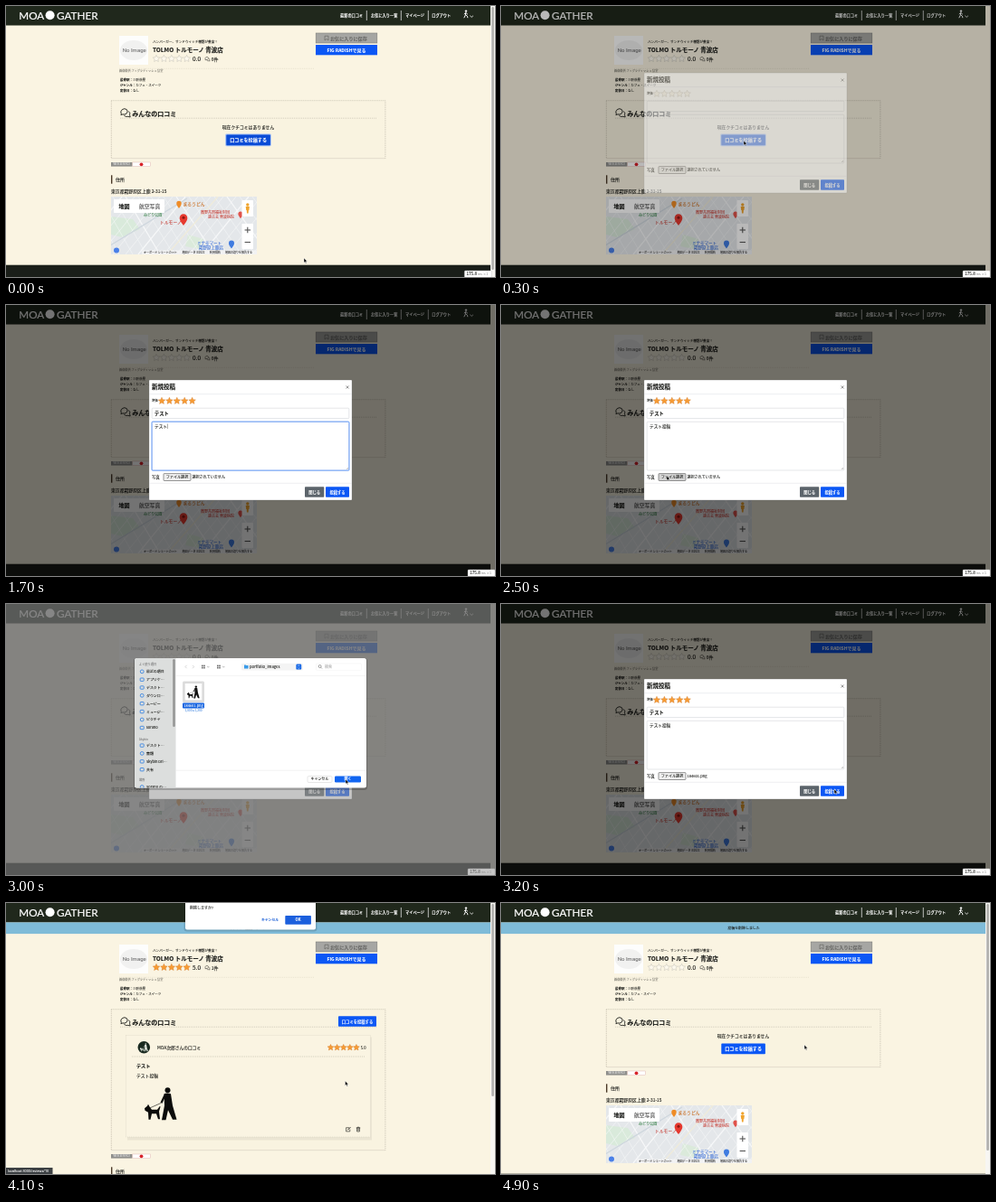
Write an HTML page that moves like this. It is 540 by 300 pixels and loops after 5000 ms.

```html
<!DOCTYPE html>
<html lang="ja">
<head>
<meta charset="utf-8">
<title>口コミ投稿</title>
<style>
html, body { margin: 0; width: 100%; height: 100%; overflow: hidden; background: #faf4e2; }
svg { display: block; width: 540px; height: 300px; font-family: "Noto Sans CJK JP", "Noto Sans JP", "Noto Sans CJK", sans-serif; }
</style>
</head>
<body>
<svg id="stage" viewBox="0 0 540 300" xmlns="http://www.w3.org/2000/svg"></svg>
<script>
const STEP = 100, LOOP = 5000;
const INK = '#1b1c19', BLUE = '#0b57f5', DARK = '#20281c', LINE = '#a9a596', CREAM = '#faf4e2', FILE = '184601.png';
const SERIF = 'font-family="Noto Serif CJK JP, Noto Serif, serif"';
const stage = document.getElementById('stage');

// y is the middle of the line; drawn large and scaled so small sizes stay exact
const text = (x, y, size, str, fill = INK, weight = 400, more = '') =>
  `<text transform="translate(${x} ${y + size * .37}) scale(.1)" font-size="${size * 10}" fill="${fill}" stroke="${fill}" stroke-width="${size * .2}" font-weight="${weight}" ${more}>${str}</text>`;
const mid = (x, y, size, str, fill, weight) => text(x, y, size, str, fill, weight, 'text-anchor="middle"');
const rect = (x, y, w, h, fill, more = '') =>
  `<rect x="${x}" y="${y}" width="${w}" height="${h}" fill="${fill}" ${more}/>`;
const line = (x1, y1, x2, y2, stroke, width = .5, more = '') =>
  `<path d="M${x1} ${y1}L${x2} ${y2}" stroke="${stroke}" stroke-width="${width}" fill="none" ${more}/>`;
const path = (d, fill, more = '') => `<path d="${d}" fill="${fill}" ${more}/>`;
const dot = (x, y, r, fill, more = '') => `<circle cx="${x}" cy="${y}" r="${r}" fill="${fill}" ${more}/>`;
const at = (x, y, body, scale = 1) => `<g transform="translate(${x} ${y}) scale(${scale})">${body}</g>`;
const edge = (stroke, width = .5) => `stroke="${stroke}" stroke-width="${width}"`;
const DASH = 'stroke-dasharray="1 1"';
const button = (x, y, w, h, label, size, fill = BLUE) =>
  rect(x, y, w, h, fill, 'rx=".8"') + mid(x + w / 2, y + h / 2, size, label, '#fff', 700);

function stars(x, y, pitch, r, on) {
  let out = '';
  for (let i = 0; i < 5; i++) {
    let pts = '';
    for (let k = 0; k < 10; k++) {
      const a = k * Math.PI / 5, q = k % 2 ? r * .48 : r;
      pts += `${(x + i * pitch + q * Math.sin(a)).toFixed(2)},${(y - q * Math.cos(a)).toFixed(2)} `;
    }
    const full = i < on;
    out += `<polygon points="${pts}" fill="${full ? '#f79b33' : '#fdf9ee'}" ${edge(full ? '#cf7a2c' : '#b3b0a6', .4)} stroke-linejoin="round"/>`;
  }
  return out;
}

const walker = (c) =>
  dot(26.5, 4, 3, c) +
  path('M22.5 8Q26 6.5 30 8L32 21L36.5 36.5H32L27 26L24.5 37H20L23 21Z', c) +
  line(23.5, 9.5, 19.5, 18, c, 2.2) + line(19.5, 18, 6, 24, c, .6) +
  path('M1 24L4 21.5L5 19.5L7 23L9 25.5H15L18 21.5L18.5 22.5L17 27.5L18 36H16L14 30H9L7.5 36.5H5.5L5 28.5L1.5 26.5Z', c);

const person = (c) => dot(3, 1.2, 1.2, c) +
  path('M2.6 3L2.4 5.6L.8 8.8M2.7 5.4L4.4 6.8L4.9 8.8M2.6 3L.8 4.6M2.9 3L4.8 4.8', 'none', edge(c, 1));

const bubbles = (c) =>
  `<g fill="none" ${edge(c, .9)} stroke-linejoin="round">` +
  path('M1.3 6.7Q-.2 3.6 2.3 1.6Q5 -.3 7.4 1.7Q9.2 4 7 6.2Q5 7.6 3 6.9L.9 7.6Z', 'none') +
  path('M9.3 3.5Q11.6 5 10.6 7.7L11.2 10L8.8 9.4Q6 10 4.4 8.2', 'none') + '</g>';

const editIcon = (x, y) => path(`M${x + 1} ${y - 1.8}H${x - 2.4}V${y + 2.4}H${x + 1.8}V${y}`, 'none', edge(INK, .6)) +
  line(x - .6, y + .7, x + 2.4, y - 2.3, INK, 1);
const trashIcon = (x, y) => path(`M${x - 1.6} ${y - 1.4}H${x + 1.6}L${x + 1.4} ${y + 2.5}H${x - 1.4}Z`, 'none', edge(INK, .6)) +
  line(x - 2.2, y - 1.7, x + 2.2, y - 1.7, INK, .7) + line(x - .7, y - 2.4, x + .7, y - 2.4, INK, .6) +
  line(x - .5, y - .5, x - .5, y + 1.7, INK, .4) + line(x + .5, y - .5, x + .5, y + 1.7, INK, .4);
const pin = (x, y, r, fill) =>
  path(`M${x} ${y + r * 2}Q${x - r * 1.1} ${y + r * .6} ${x - r} ${y}A${r} ${r} 0 1 1 ${x + r} ${y}Q${x + r * 1.1} ${y + r * .6} ${x} ${y + r * 2}Z`, fill);

function header() {
  const nav = [[369, '最新の口コミ'], [403, 'お気に入り一覧'], [441, 'マイページ'], [470.3, 'ログアウト']];
  const font = 'font-family="Lato, sans-serif"';
  return rect(0, 0, 540, 21.5, DARK) +
    text(14.3, 10.3, 11.7, 'MOA', '#fff', 400, font) + dot(48.6, 10.3, 5, '#fff') +
    text(56, 10.3, 11.7, 'GATHER', '#fff', 400, font) +
    nav.map(([x, s]) => text(x, 10.6, 4.2, s, '#fff', 700)).join('') +
    [398.3, 436.3, 466.3].map(x => line(x, 5, x, 16, '#fff', .7)).join('') +
    at(505, 4.4, person('#fff')) +
    path('M512.4 10.7L514.2 12.4L516 10.7', 'none', edge('#fff', .8));
}

function map() {
  let roads = '';
  for (let i = 0; i < 16; i++) {
    const x = i * 14 - 40;
    roads += line(x, 64, x + 52, 0, '#f7f8f9', i % 5 ? .6 : 1.3) + line(x, 0, x + 34 + i, 64, '#f7f8f9', i % 4 ? .5 : 1.2);
  }
  const foot = ['キーボード ショートカット', '地図データ ©2022', '利用規約', '地図の誤りを報告する'];
  const footX = [36, 78.5, 109, 126];
  const red = '#c8453d', blue = '#3b6fd6';
  return '<svg width="161" height="64" viewBox="0 0 161 64">' +
    rect(0, 0, 161, 64, '#e4e7ea') +
    path('M0 22L24 25L32 36L12 45L0 42Z', '#d9eadb') + path('M85 42L102 47L97 58L82 55Z', '#dbeadb') +
    roads + line(-4, 56, 84, 2, '#cfd7de', 1.4) + line(62, 64, 118, 0, '#f0ecdb', 1.3) +
    text(36, 20, 4.1, 'みどり公園', '#4c8f5a') +
    pin(75, 7.5, 2.7, '#ef8c27') + text(79.5, 8, 4.8, 'まるうどん', '#c96d1f') +
    text(54, 28, 4.8, 'トルモーノ', red) +
    text(99, 18, 4, '霞野共同福祉財団', red) + text(107, 23, 4, '連合会 青波病院', red) +
    pin(143, 19, 2.6, '#e0524b') +
    text(95, 51, 4.5, 'ミナモマート', blue) + text(97, 56, 4.5, '霞野原上鹿店', blue) +
    pin(133, 51.5, 3, '#3f7be0') +
    pin(80, 23.5, 4.3, '#e6392f') + dot(80, 23.3, 1.5, '#8b1712') +
    rect(3, 3, 56, 15, '#fff', 'rx=".8"') +
    text(8.5, 10.4, 6, '地図', INK, 700) + text(31, 10.4, 5.8, '航空写真', '#555') +
    rect(144.5, 4, 12.5, 18, '#fff', 'rx=".8"') + dot(150.8, 9, 1.7, '#f0a42e') +
    path('M148.7 11H152.9L152.4 15H151.9L151.6 18.5H150L149.7 15H149.2Z', '#f0a42e') +
    rect(144.5, 30, 12.5, 28, '#fff', 'rx=".8"') +
    line(147.6, 37, 154, 37, '#555', 1.1) + line(150.8, 33.8, 150.8, 40.2, '#555', 1.1) + line(147.6, 50.5, 154, 50.5, '#555', 1.1) +
    rect(34, 59.4, 127, 4.6, '#f5f5f5', 'opacity=".85"') +
    foot.map((s, i) => text(footX[i], 61.8, 3, s, '#222')).join('') +
    dot(6, 59.5, 3, '#4a80e8') + '</svg>';
}
const MAP = map();

function info(s) {
  const x = s.icons ? 206 : 167;
  const rows = [['最寄駅：', '三軒茶屋'], ['ジャンル：', 'カフェ・スイーツ'], ['定休日：', 'なし']];
  return rect(125, 33, 32, 32, '#fdfdfc') +
    `<ellipse cx="141" cy="49" rx="15" ry="11" fill="#f1f1f0"/>` +
    text(128.8, 49, 6, 'No Image', '#777', 400, 'font-family="Roboto, sans-serif"') +
    text(162, 40, 3.6, 'ハンバーガー、サンドウィッチ種類が豊富！') +
    text(162, 48.6, 6.5, 'TOLMO トルモーノ 青波店', INK, 700) +
    (s.icons ? stars(166, 58.3, 8.4, 4, s.review ? 5 : 0) : '') +
    text(x, 58.6, 6.5, s.review ? '5.0' : '0.0') +
    at(x + 13.5, 56, bubbles(INK), .5) + text(x + 20.7, 59, 5, s.review ? '1件' : '0件') +
    line(125, 69.3, 341, 69.3, '#c9c4b3', .4, DASH) +
    text(125, 72.2, 3.15, '画像提供:フィグラディッシュ 食堂', '#77756c') +
    rows.map(([a, b], i) => text(126, 81.3 + i * 6, 3.5, `<tspan font-weight="700">${a}</tspan>${b}`)).join('') +
    rect(342.2, 30, 67.6, 11, '#a6a6a3', edge('#7c7c79', .6)) +
    path('M352 33.2H356V38L354 36.5L352 38Z', 'none', edge('#5e5e5c', .6)) +
    text(358, 35.7, 5.1, 'お気に入りに保存', '#686866', 700) +
    rect(342, 43, 68, 11.3, BLUE) + mid(376, 48.7, 5, 'FIG RADISHで見る', '#fff', 700);
}

function card(s) {
  const h = s.icons ? 112.5 : 72.5, low = s.icons ? 237.5 : 197;
  return rect(134, 135.5, 270, h + 1.5, '#ebe5d3') +
    rect(132.5, 133.5, 270, h, CREAM, edge('#cfcaba') + DASH) +
    (s.icons ? dot(152.3, 146.7, 6.8, '#1a2a20') + at(147.6, 142, walker('#e9efe6'), .25) : '') +
    text(167, 147.2, 4.75, 'MOA次郎さんの口コミ') +
    (s.icons ? stars(358.5, 147, 7.1, 3.6, 5) : '') + text(391.8, 147.2, 4.2, '5.0') +
    line(139, 157, 397, 157, LINE, .5, DASH) +
    text(144, 167.2, 5.1, 'テスト', INK, 700) + text(144, 178.6, 4.8, 'テスト投稿') +
    (s.icons ? at(152, 190.3, walker('#0c0c0b')) : '') +
    editIcon(378, low) + trashIcon(389, low);
}

function reviews(s, h) {
  const head = rect(116.3, 104.7, 302.6, h, '#f9f3e0', edge(LINE, .6) + DASH) +
    (s.icons ? at(126, 113, bubbles(INK)) : '') +
    text(139.2, 119, 7, 'みんなの口コミ', INK, 700) +
    line(126, 124.2, 410, 124.2, LINE, .5, DASH);
  if (s.review) return head + button(367, 112.2, 42, 11.5, '口コミを投稿する', 4.3) + card(s);
  return head + mid(267.5, 134.2, 4.8, '現在クチコミはありません') +
    (s.press ? rect(242.2, 141.6, 50.6, 13.6, '#9dbcf5', 'rx="1.4"') : '') +
    button(243.3, 142.6, 48.6, 11.7, '口コミを投稿する', 5.1, s.press ? '#0a4bd6' : BLUE);
}

function page(s) {
  const dy = s.flash ? 13 : 0;
  const h = !s.review ? 64 : s.icons ? 156 : 116;
  const place = rect(116, 173, 23.5, 4.6, '#8f8f8c') + mid(127.8, 175.2, 3, 'WEB SERVICE', '#eee') +
    rect(139.8, 173, 19.5, 4.6, '#fff', edge('#d9a9a5', .4)) + dot(149.5, 175.3, 1.9, '#d8232a') +
    rect(116, 187.3, 1.4, 9.4, '#4b3a28') + text(121, 192.2, 5, '住所') +
    text(116, 205.2, 4.85, '東京都霞野原区上鹿 2-31-15') +
    at(116, 211, MAP) + rect(0, 286.7, 540, 40, '#1a1e19');
  return rect(0, 0, 540, 300, CREAM) +
    at(0, dy, info(s) + reviews(s, h) + at(0, h - 64, place)) + header() +
    (s.flash ? rect(0, 21.5, 540, 12.6, '#7fbbd8') + mid(268, 28, 3.95, s.flash) : '') +
    rect(535, 0, 5, 300, s.modal ? CREAM : '#f7f6f2') +
    (s.modal ? '' : rect(536.2, 1, 2.7, s.thumb, '#b0b0ad', 'rx="1.3"'));
}

function ime(x, y, word) {
  return rect(x - .4, y + .6, 51.6, 59, '#000', 'opacity=".22" rx="2"') +
    rect(x, y, 50, 58, '#fff', `rx="1.5" ${edge('#b5b5b3', .4)}`) +
    text(x + 2.6, y + 5, 5.2, word, INK, 400, SERIF) +
    rect(x + .3, y + 51.5, 49.4, 6, '#e9e9e8') +
    text(x + 3, y + 54.6, 2.9, 'Tab キーで予測された候補を選択', '#333');
}

const field = (y, h, focus) =>
  (focus ? rect(160.8, y - .4, 218.4, h + .8, 'none', `rx="1.2" ${edge('#a9c8fb', .8)}`) : '') +
  rect(161.2, y, 217.6, h, '#fff', `rx=".9" ${edge(focus ? '#4683ee' : '#c9ccd0', focus ? .7 : .5)}`);

function modal(s) {
  const raw = s.cand && s.focus === 1;
  return rect(158, 83, 224, 133, '#fff', `rx=".8" ${edge('#777', .3)}`) +
    text(161, 91, 6.5, '新規投稿', INK, 700) +
    line(375.6, 89.5, 378.6, 92.5, '#666', .7) + line(378.6, 89.5, 375.6, 92.5, '#666', .7) +
    line(158, 98.6, 382, 98.6, '#dcdfe2') +
    text(161.2, 106.2, 3.3, '評価') + stars(172, 106.2, 8.4, 4, s.rate) +
    field(114.2, 11.4, s.focus === 1) +
    text(164, 120.2, 5.2, s.title, INK, 700, raw ? SERIF + ' text-decoration="underline"' : '') +
    (s.focus === 1 ? line(164.3 + s.title.length * 4.2, 117, 164.3 + s.title.length * 4.2, 123.5, INK) : '') +
    field(129.3, 53.7, s.focus === 2) +
    text(164, 134.3, 4.65, s.body, INK, 400, s.cand ? 'text-decoration="underline"' : '') +
    (s.focus === 2 ? line(164.4 + s.body.length * 4.65, 131.5, 164.4 + s.body.length * 4.65, 137, INK, .4) : '') +
    line(376, 182, 378, 180, '#777', .4) + line(377.2, 182, 378, 181.2, '#777', .4) +
    text(161.2, 190.5, 4.2, '写真') +
    rect(174, 186.6, 30, 7.9, s.pick ? '#d4d4d4' : '#efefef', `rx=".8" ${edge('#555', .6)}`) +
    mid(189, 190.5, 4.1, 'ファイル選択') +
    text(205.4, 190.5, 4.1, s.file || '選択されていません') +
    line(158, 197.3, 382, 197.3, '#dcdfe2') +
    button(330, 201.2, 21.3, 11.6, '閉じる', 4.3, '#5c646b') +
    button(353, 201.2, 26, 11.6, '投稿する', 4.3, s.send ? '#0a48cf' : BLUE) +
    (s.cand ? (raw ? ime(162, 126, s.cand) : ime(163, 139, s.cand)) : '');
}

function picker(s) {
  const heads = [[67, 'よく使う項目'], [149.5, 'Skybin'], [194.8, '場所']];
  const items = [[74.8, '最近の項目'], [83.7, 'アプリケ…'], [92.5, 'デスクト…'], [101.3, 'ダウンロ…'], [110.2, 'ムービー'],
    [119.1, 'ミュージ…'], [128, 'ピクチャ'], [137, 'sorano'], [156.6, 'デスクト…'], [165.4, '書類'], [174.3, 'Skybin Dri…'],
    [183.2, '共有'], [202.5, 'Sorano の…']];
  const grid = (x) => [0, 2.2].map(a => [0, 2.2].map(b => rect(x + a, 67.6 + b, 1.6, 1.6, '#666')).join('')).join('') +
    path(`M${x + 6.2} 69L${x + 7.3} 70.1L${x + 8.4} 69`, 'none', edge('#666', .5));
  return '<clipPath id="sheet"><rect x="142" y="60" width="256" height="143.5" rx="2.5"/></clipPath>' +
    rect(141, 60, 258, 146, '#000', 'opacity=".2" rx="3"') + '<g clip-path="url(#sheet)">' +
    rect(142, 60, 256, 144, '#fff') + rect(142, 60, 45.5, 144, '#dcdedd') +
    rect(184.2, 61, 2.6, 75, '#969796', 'rx="1.3"') +
    heads.map(([y, n]) => text(147, y, 3.2, n, '#777')).join('') +
    items.map(([y, n], i) => (i % 3 ? rect(148.2, y - 1.7, 4, 3.4, 'none', `rx=".6" ${edge('#2a7de1', .8)}`) :
      dot(150.2, y, 1.9, 'none', edge('#2a7de1', .8))) + text(155, y, 3.95, n)).join('') +
    path('M199.6 67.8L198 69.5L199.6 71.2M206 67.8L207.6 69.5L206 71.2', 'none', edge('#c4c4c4', .7)) +
    grid(216) + grid(233) +
    rect(260, 65.8, 68, 7.6, '#f4f4f4', 'rx="1.2"') +
    path('M263 67.4H264.8L265.4 68H267.6V71.6H263Z', '#3a9be8') + text(269, 69.5, 4.2, 'portfolio_images') +
    rect(320.4, 66.6, 5.8, 6, '#1567e6', 'rx="1.2"') +
    path('M322.1 69L323.3 67.8L324.5 69M322.1 70.3L323.3 71.5L324.5 70.3', 'none', edge('#fff', .5)) +
    rect(342.5, 65.8, 50, 7.6, '#fff', `rx="1.2" ${edge('#eee', .4)}`) +
    dot(346.6, 69, 1.5, 'none', edge('#666', .6)) + line(347.7, 70.2, 349, 71.5, '#666', .6) + text(352, 69.5, 4, '検索', '#aaa') +
    line(187.5, 79.3, 398, 79.3, '#e4e4e4') +
    (s.chosen ? rect(195, 85.5, 24, 23.5, '#dcdcdc', 'rx="1.5"') + rect(195, 109.6, 24, 6, '#1463e0', 'rx="1"') : '') +
    rect(197.3, 87.8, 19.4, 19, '#fff', edge('#ccc', .4)) + at(199.5, 90, walker('#111'), .39) +
    mid(207, 112.6, 4, FILE, s.chosen ? '#fff' : INK) + mid(207, 117.8, 3.2, '1,000×1,200', '#4a8ce0') +
    line(187.5, 184.2, 398, 184.2, '#e4e4e4') +
    rect(333, 190.6, 27, 6.9, '#fff', `rx="1.2" ${edge('#ccc', .5)}`) + mid(346.5, 194, 4, 'キャンセル') +
    rect(363, 190.6, 29, 6.9, s.chosen ? '#1266f1' : '#d5d5d5', 'rx="1.2"') + mid(377.5, 194, 4, '開く', '#fff', 700) + '</g>';
}

const confirmBox = () =>
  rect(196.5, -4, 147, 35.5, '#000', 'opacity=".14" rx="3"') + rect(198, -4, 144, 33.6, '#fff', 'rx="2"') +
  text(203, 5.6, 4, '削除しますか?') + mid(291.5, 19, 3.8, 'キャンセル', '#1f62d8', 700) +
  button(308.3, 14, 28.6, 9.8, 'OK', 4.1, '#1b5fdd');

function badge(s) {
  const right = s.modal ? 540 : 536.3, w = s.count > 9 ? 33.5 : 30;
  return rect(right - w, 293, w, 7.5, '#fff', `rx="1" ${edge('#bbb', .4)}`) +
    text(right - w + 2.2, 296.6, 4.6, `${s.ms} <tspan fill="#777" stroke="none" font-size="35">ms ×${s.count}</tspan>`);
}

const arrow = (x, y) => at(x, y, path('M0 0V5.2L1.2 4.1L2 5.9L2.9 5.5L2.1 3.8H3.7Z', '#000', edge('#fff', .45)));

// each row: time, then what differs from that moment on
const script = [
  [0, { icons: 1, thumb: 291, ms: '175.8', count: 1, rate: 0, title: '', body: '', press: 1 }],
  [300, { modal: .5 }], [400, { modal: 1 }],
  [500, { rate: 2 }], [600, { rate: 5 }], [700, { focus: 1 }],
  [800, { title: 'ｔ', cand: 'T' }], [900, { title: 'てs', cand: 'TEs' }], [1000, { title: 'てす', cand: 'テス' }],
  [1100, { title: 'てすと', cand: 'テスト' }], [1200, { title: 'テスト', cand: '' }],
  [1300, { focus: 2 }], [1400, { body: 'ｔ', cand: 'T' }], [1500, { body: 'てs', cand: 'TEs' }],
  [1600, { body: 'てすと', cand: 'テスト' }], [1700, { body: 'テスト', cand: '' }],
  [1800, { body: 'テストと', cand: 'と' }], [1900, { body: 'テストとう', cand: '投' }],
  [2000, { body: 'テストとうこう', cand: '投稿' }], [2100, { body: 'テスト投稿', cand: '' }],
  [2300, { focus: 0 }], [2500, { pick: 1 }], [2700, { picker: 1 }], [2800, { chosen: 1 }],
  [3100, { picker: 0, pick: 0, file: FILE }], [3300, { send: 1 }],
  [3400, { modal: 0, review: 1, icons: 0, press: 0, flash: '口コミを投稿しました', thumb: 236, ms: '575.3', count: 17 }],
  [3500, { icons: 1, thumb: 213 }], [3700, { ms: '' }], [3800, { link: 1 }], [4000, { ask: 1 }],
  [4300, { ask: 0 }], [4400, { link: 0, review: 0, flash: '投稿を削除しました', thumb: 273 }]
];

const mouse = [[0, 329, 279], [100, 318, 256], [200, 285, 180], [300, 268, 149], [400, 250, 138], [500, 181, 107], [600, 206, 107],
  [700, 230, 119], [1200, 230, 132], [1300, 235, 145], [2200, 232, 158], [2400, 186, 189], [2500, 183, 189], [2600, 183, 189],
  [2700, 200, 130], [2800, 207, 98], [2900, 300, 156], [3000, 375, 194], [3100, 375, 195], [3200, 368, 205], [3300, 367, 207],
  [3400, 369, 209], [3600, 380, 229], [3800, 389, 250], [4000, 389, 250], [4100, 374.5, 197], [4200, 334, 60], [4300, 322, 18],
  [4400, 322, 19], [4600, 328, 90], [4800, 335, 155], [4900, 335, 157]];

function pointer(t) {
  if ((t >= 800 && t < 1200) || (t >= 1400 && t < 2200)) return '';
  const i = mouse.findIndex(m => m[0] > t);
  const a = mouse[(i < 0 ? mouse.length : i) - 1], b = i < 0 ? a : mouse[i];
  const k = b === a ? 0 : (t - a[0]) / (b[0] - a[0]);
  return arrow(a[1] + (b[1] - a[1]) * k, a[2] + (b[2] - a[2]) * k);
}

function draw(t) {
  const s = {};
  for (const [time, change] of script) if (time <= t) Object.assign(s, change);
  let out = page(s);
  if (s.modal) out += rect(0, 0, 540, 300, '#000', `opacity="${s.modal * .55}"`) +
    `<g opacity="${s.modal}">${at(0, (s.modal - 1) * 18, modal(s))}</g>`;
  if (s.ms) out += badge(s);
  if (s.picker) out += rect(0, 0, 540, 300, '#969696', 'opacity=".55"') + picker(s);
  if (s.link) out += rect(0, 293, 51.5, 7, '#3c4043') +
    text(2, 296.5, 3.8, 'localhost:3000/reviews/10', '#fff', 400, 'font-family="Roboto, sans-serif"');
  if (s.ask) out += confirmBox();
  stage.innerHTML = out + pointer(t);
}

const start = performance.now();
let shown = -1;
function tick(now) {
  const t = Math.floor(Math.max(0, now - start) % LOOP / STEP) * STEP;
  if (t !== shown) draw(shown = t);
  requestAnimationFrame(tick);
}
tick(start);
</script>
</body>
</html>
```
